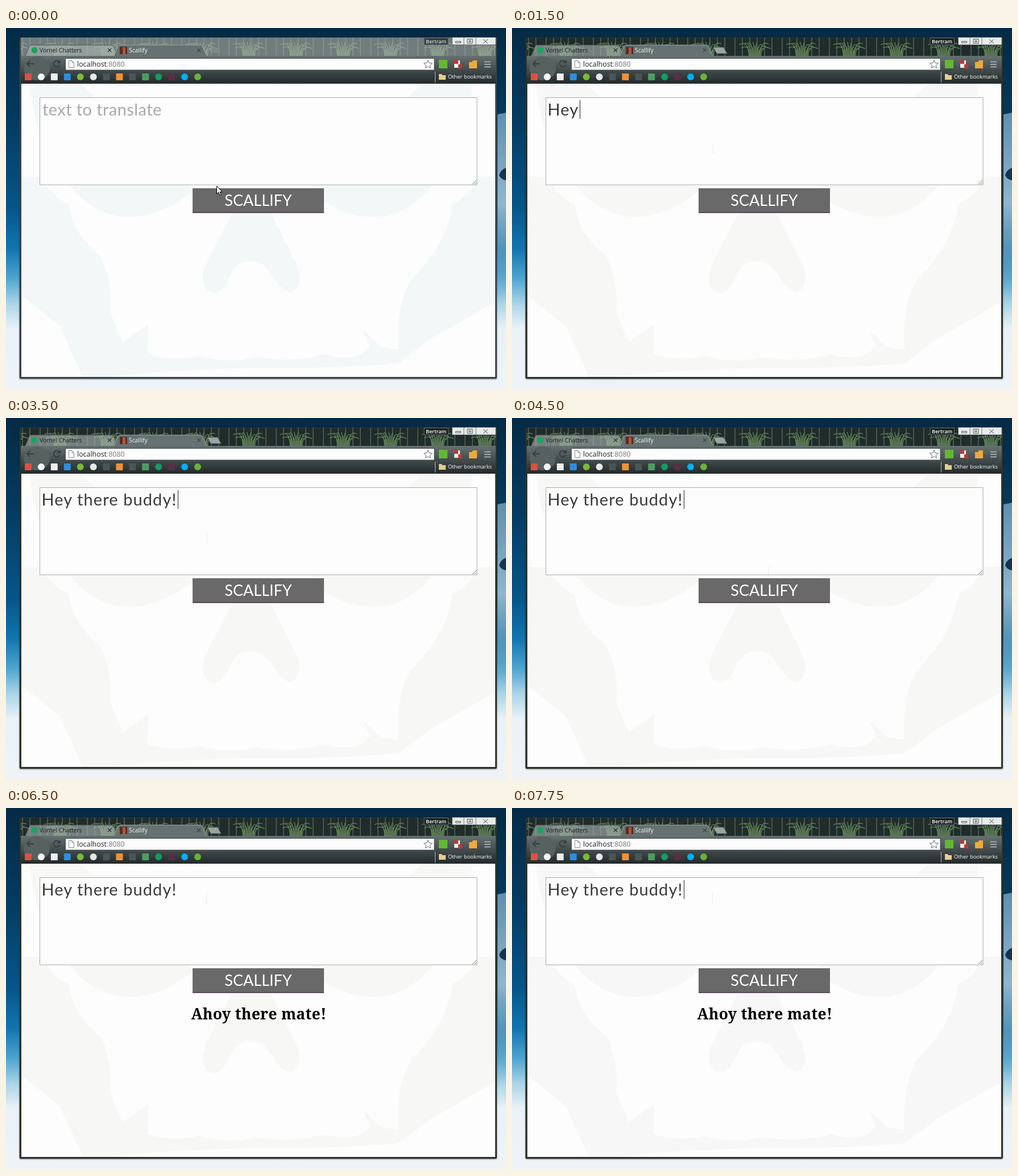
Write an HTML page that moves like this. It is 879x637 px and loops after 8000 ms.

```html
<!DOCTYPE html>
<html lang="en">
<head>
<meta charset="utf-8">
<title>Translator</title>
<style>
html, body { margin: 0; width: 100%; height: 100%; overflow: hidden; }
svg { display: block; }
text { white-space: pre; font-family: "Open Sans", sans-serif; }
.field { font: 29px Lato, sans-serif; }
</style>
</head>
<body>
<svg width="879" height="637" viewBox="0 0 879 637">
  <defs>
    <linearGradient id="sky" x2="0" y2="1">
      <stop offset="0" stop-color="#052a45"/>
      <stop offset=".25" stop-color="#043a60"/>
      <stop offset=".5" stop-color="#06568a"/>
      <stop offset=".61" stop-color="#1275b0"/>
      <stop offset=".69" stop-color="#4da3cf"/>
      <stop offset=".76" stop-color="#a9d3e7"/>
      <stop offset=".83" stop-color="#eaf2f7"/>
      <stop offset="1" stop-color="#eef3f7"/>
    </linearGradient>
    <linearGradient id="bar" x2="0" y2="1">
      <stop offset="0" stop-color="#657170"/>
      <stop offset=".5" stop-color="#434c4d"/>
      <stop offset="1" stop-color="#23292a"/>
    </linearGradient>
    <linearGradient id="face" x2="0" y2="1">
      <stop offset="0" stop-color="#5f8fb2"/>
      <stop offset=".5" stop-color="#8fb6cf"/>
      <stop offset="1" stop-color="#8fb6cf" stop-opacity="0"/>
    </linearGradient>
    <pattern id="forest" x="55" y="16" width="83" height="33" patternUnits="userSpaceOnUse">
      <path fill="#1f2c2a" d="M0 0H83V33H0Z"/>
      <path id="stalks" stroke="#46554f" stroke-width="2"/>
      <path id="grass" fill="none" stroke="#5f8054" stroke-width="1.3"/>
    </pattern>
    <clipPath id="view"><path d="M27 98H860V614H27Z"/></clipPath>
    <path id="socket" d="M42 98H130L330 285C285 325 235 338 192 330C140 318 110 280 80 230C55 180 45 140 42 98Z"/>
  </defs>

  <path fill="url(#sky)" d="M0 0H879V637H0Z"/>
  <path fill="url(#face)" d="M864 152L879 149V470H864Z"/>
  <path fill="#18334f" d="M879 246Q869 250 867 259Q870 267 879 268Z"/>
  <rect x="22.500" y="14.500" width="842" height="605" rx="4" opacity=".13"/>
  <rect id="frame" x="23.500" y="16" width="839.500" height="601.500" rx="3"/>

  <path fill="url(#forest)" d="M26 17H861V49H26Z"/>
  <path id="fade" fill="#b4bdbf" opacity=".55" d="M26 17H861V49H26Z"/>
  <path fill="url(#bar)" d="M26 49H861V98H26Z"/>
  <path fill="#aab4b2" fill-opacity=".62" stroke="#4c5755" d="M34 49L41 32Q42 30 45 30H185Q188 30 189 32L197 49"/>
  <path fill="#667271" stroke="#9aa5a3" d="M190 49L197 32Q198 30 201 30H341Q344 30 345 32L353 49"/>
  <path id="newTab" fill="#9aa4a2" stroke="#55605e" d="M354 34H372L378 45H360Z"/>
  <circle cx="50" cy="39" r="5.5" fill="#1da362"/>
  <path fill="#5a2b22" d="M200 33H213V46H200Z"/>
  <path fill="#b5533a" d="M205 34H210V46H205Z"/>
  <text x="59" y="43" font-size="10.3" fill="#1c2222">Vornel Chatters</text>
  <text x="216" y="43" font-size="10.3" fill="#f4f6f6">Scallify</text>
  <path stroke="#2c3434" stroke-width="1.3" d="M179 36L185 42M185 36L179 42"/>
  <path stroke="#3b4646" stroke-width="1.3" d="M336 36L342 42M342 36L336 42"/>
  <g id="badge">
    <path fill="#1b2222" stroke="#606a6a" d="M735 17.5H777.5V29.5H735Z"/>
    <text x="756" y="27" font-size="9" font-weight="600" fill="#fff" text-anchor="middle">Bertram</text>
  </g>
  <path fill="#e8ebeb" stroke="#6d7676" d="M784.500 16.500H861V29.500H784.500ZM805 16V30M826 16V30"/>
  <path fill="none" stroke="#4d5555" d="M790.500 23.500H799.500V26H790.500ZM811 19.500H820V27H811ZM814 22H817V24.500H814ZM839 20L847 27M847 20L839 27"/>

  <ellipse cx="54" cy="71" rx="23" ry="21" fill="#566160"/>
  <path fill="none" stroke="#353e3e" stroke-width="2" d="M49 63H37M42 58L37 63L42 68M94 60A5.500 5.500 0 1 0 94.500 65M95 57V61H90"/>
  <path fill="#fdfdfd" stroke="#424c4c" d="M104.500 53.500H753V74H104.500Z"/>
  <path fill="#fff" stroke="#858b8b" d="M110.500 57.500H116L119.500 61V69.500H110.500ZM116 57.500V61H119.500"/>
  <text x="125" y="68" font-size="12.4" fill="#222">localhost<tspan fill="#777">:8080</tspan></text>
  <path fill="#fff" stroke="#666f70" d="M742 56.500L744 61.500L749.500 62L745.300 65.500L746.700 70.500L742 67.700L737.300 70.500L738.700 65.500L734.500 62L740 61.500Z"/>
  <path fill="#62b832" d="M761 56H776V71H761Z"/>
  <path fill="#eef0f0" d="M788 57H798V70H788Z"/>
  <path fill="#c9332c" d="M788 57H795V63H788ZM795 64H802V71H795Z"/>
  <path fill="#eda93d" d="M814 60H819L821 57H828V71H814Z"/>
  <path stroke="#a0a9a8" stroke-width="2" d="M841 59.500H852M841 64H852M841 68.500H852"/>
  <g id="bookmarks"></g>
  <path stroke="#b5bcbc" d="M754.500 77V96"/>
  <path fill="#e5cf8c" d="M761 81H766L767 83H773V91H761Z"/>
  <text x="777" y="89" font-size="9.4" fill="#fff">Other bookmarks</text>

  <g clip-path="url(#view)">
    <path fill="#fdfdfd" d="M27 98H860V614H27Z"/>
    <g id="skull">
      <path d="M27 262H860V482L750 545L690 590Q580 600 430 598Q250 604 180 614H135L95 525L27 470Z"/>
      <path fill="#fdfdfd" d="M60 262Q85 300 110 310Q118 365 165 400Q188 445 183 500L205 553L250 521L249 574Q290 588 340 577Q390 592 440 579Q500 590 560 574Q600 585 625 574L640 560L627 531L660 562L690 566Q685 480 715 440Q775 380 785 310Q815 295 830 262Z"/>
      <use href="#socket"/>
      <use href="#socket" transform="translate(862) scale(-1 1)"/>
      <path d="M398 325L352 415C340 440 347 465 366 466C390 464 392 424 412 414Q430 407 448 414C468 424 476 462 500 464C518 460 520 435 510 415L465 325Z"/>
    </g>
  </g>

  <path fill="#fdfdfd" stroke="#a9a9a9" d="M59.500 122.500H828V276H59.500Z"/>
  <path stroke="#777" d="M820 275L827 268M824 275L827 272"/>
  <text id="hint" class="field" x="64" y="154" fill="#a9a9a9" letter-spacing=".42">text to translate</text>
  <text id="typed" class="field" x="62.500" y="154" fill="#3a3a3a" letter-spacing="1.08"></text>
  <path id="caret" stroke="#222" d="M.5 127V160"/>
  <path id="button" d="M328 282H559V325H328Z"/>
  <path fill="#3a2c3a" d="M328 324H559V325.500H328Z"/>
  <text x="443.500" y="313" fill="#fff" text-anchor="middle" style="font: 27px Lato, sans-serif">SCALLIFY</text>
  <text id="reply" x="444.500" y="372" text-anchor="middle" letter-spacing=".3" style="font: bold 26.500px 'Noto Serif', serif">Ahoy there mate!</text>

  <g id="arrow"><path fill="#fff" stroke="#000" d="M.5 0V14L3.500 11L6 16.500L8 15.500L6 10.500H10Z"/></g>
  <g id="beam"><path stroke="#000" opacity=".06" d="M.5 -8V8M-2 -8H3M-2 8H3"/></g>
  <g id="hand"><path fill="#fff" stroke="#222" stroke-width=".8" d="M-2 1Q0 -1 2 1V7L7 8Q9 9 9 12L7 19H-1L-5 11Q-4 9 -2 12Z"/></g>
</svg>
<script>
const LOOP = 8000;
const $ = id => document.getElementById(id);
const set = (id, name, value) => $(id).setAttribute(name, value);
const show = (id, on) => set(id, 'visibility', on ? 'visible' : 'hidden');

// Each track is a list of [start time, value] steps.
const text = [[0, ''], [1250, 'H'], [1500, 'Hey'], [1750, 'Hey t'], [2000, 'Hey the'],
  [2250, 'Hey there '], [2500, 'Hey there bu'], [2750, 'Hey there bud'],
  [3000, 'Hey there buddy'], [3500, 'Hey there buddy!']];
const caret = [[0, false], [500, true], [1000, false], [1250, true], [4000, false],
  [4500, true], [4750, false], [7750, true]];
const pointer = [[0, ['arrow', 370, 278]], [250, ['arrow', 356, 284]], [500, ['beam', 353, 212]],
  [4000, ['beam', 352, 197]], [4250, ['beam', 319, 147]], [4500, ['beam', 450, 271]],
  [4750, ['hand', 449, 305]], [6000, ['hand', 453, 305]], [6250, ['beam', 352, 159]]];
const skullTint = [[0, '#f3f7f7'], [500, '#f7f7f5'], [7500, '#f7f7f7']];
const at = (track, t) => track.findLast(([start]) => start <= t)[1];

function drawForest() {
  let stalks = '', grass = '';
  for (let x = 5; x < 83; x += 13) stalks += `M${x} 0V33`;
  for (let i = 0; i < 15; i++) {
    const lean = (i - 7) * 4, top = 5 + (i * 7) % 13;
    grass += `M${40 + (i - 7) * 1.5} 33Q${40 + lean * .4} ${top} ${40 + lean} ${top + Math.abs(lean) * .3}`;
  }
  set('stalks', 'd', stalks);
  set('grass', 'd', grass);
}

function drawBookmarks() {
  const colors = ['#d95245', '#f4f5f5', '#eeeeee', '#2e8ed8', '#79b83c', '#e5e8e8', '#4c5556',
    '#ef9136', '#4c5556', '#4d9d60', '#159b61', '#563044', '#00aff0', '#68b23b'];
  const round = [1, 4, 5, 10, 12, 13];
  $('bookmarks').innerHTML = colors.map((color, i) => {
    const x = 39 + i * 22.92;
    return `<rect x="${x - 6}" y="80" width="12" height="12" rx="${round.includes(i) ? 6 : 1}" fill="${color}"/>`;
  }).join('');
}

function render(t) {
  const active = t >= 500, hover = t >= 4750 && t < 6250;
  const value = at(text, t), [kind, x, y] = at(pointer, t);
  show('fade', !active);
  set('newTab', 'opacity', active ? 1 : .3);
  set('badge', 'opacity', active ? 1 : .7);
  set('frame', 'fill', active ? '#2e3428' : '#3a4447');
  set('skull', 'fill', at(skullTint, t));
  set('button', 'fill', hover ? '#484848' : '#696969');
  show('hint', !value);
  $('typed').textContent = value;
  show('caret', at(caret, t));
  const offset = value ? Math.round($('typed').getComputedTextLength()) : 0;
  set('caret', 'transform', `translate(${64 + offset})`);
  show('reply', t >= 5000);
  for (const id of ['arrow', 'beam', 'hand']) show(id, id === kind);
  set(kind, 'transform', `translate(${x} ${y})`);
}

function tick() {
  render(performance.now() % LOOP);
  requestAnimationFrame(tick);
}

drawForest();
drawBookmarks();
tick();
</script>
</body>
</html>
```
